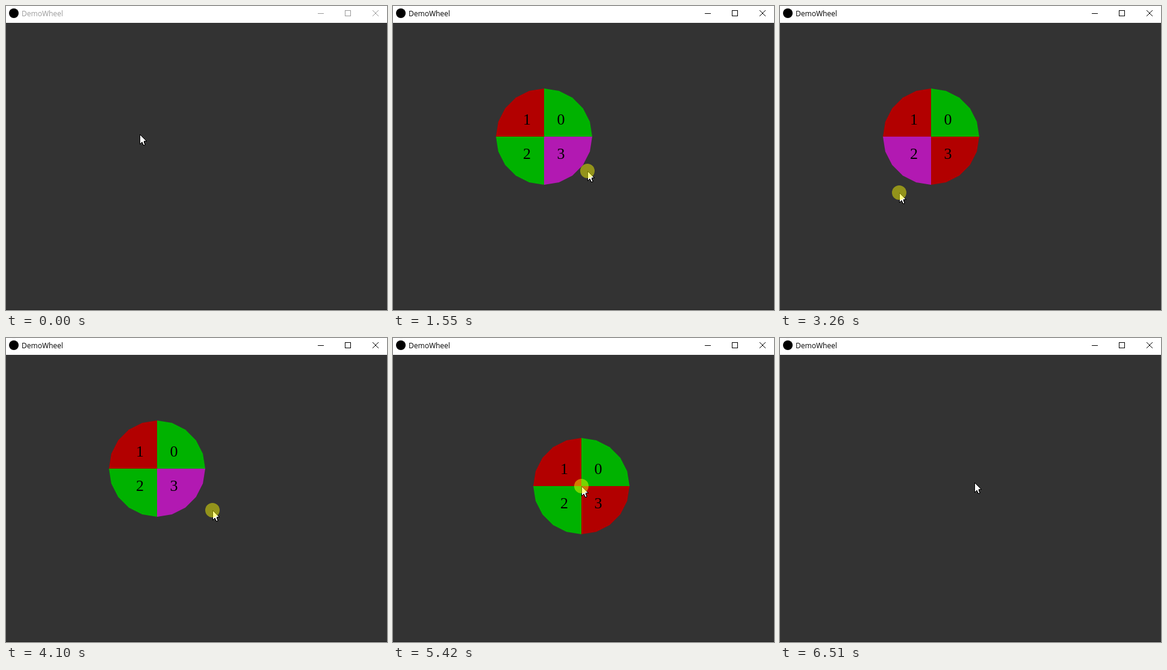
Recreate the animation shown at these times as an HTML page. Size 633 px wide and 505 px high, loop 6590 ms.

```html
<!DOCTYPE html>
<html lang="en">
<head>
<meta charset="utf-8">
<title>Pie menu</title>
<style>
  html, body { margin: 0; width: 100%; height: 100%; overflow: hidden; background: #333; }
  svg { display: block; width: 633px; height: 505px; }
  .title { font: 12px "Open Sans", sans-serif; }
  .digit { font: 26px "Liberation Serif", serif; text-anchor: middle; }
  .crisp { shape-rendering: crispEdges; }
</style>
</head>
<body>
<svg viewBox="0 0 633 505">
  <rect width="633" height="505" fill="#333"/>
  <rect y="504" width="633" height="1" fill="#222"/>
  <rect width="633" height="28" fill="#fff"/>
  <circle cx="13" cy="12" r="8"/>
  <text id="title" class="title" x="26" y="17">DemoWheel</text>
  <g id="buttons" fill="none">
    <path class="crisp" d="M518 12.5h10M563.5 7.5h9v9h-9z"/>
    <path d="M609 7l10 10M619 7l-10 10"/>
  </g>
  <g id="pie"></g>
  <path id="cursor" class="crisp" d="M.5 .5V16.5L4 13 6.5 18.5H8.5L9 16.5 7 12.5V11.5H11.5Z" fill="#fff" stroke="#000"/>
  <circle id="press" r="12" fill="#ff0" fill-opacity=".47"/>
</svg>
<script>
const DURATION = 6590, STEP = 76.6, TICK = 5;
const RADIUS = 80, DEAD_ZONE = 10, ARC_SIDES = 5, QUARTER = Math.PI / 2;
const GREEN = '#00b200', RED = '#b20000', HOVER = '#b219b2';

// Each stroke carries the cursor on to x, y; orbits turn counterclockwise about the menu
const START = { x: 222, y: 213 };
const strokes = [
  { from: 70, to: 230, x: 251, y: 217 },
  { from: 1160, to: 1550, x: 323, y: 274 },
  { from: 1800, to: 2260, x: 231, y: 140, orbit: true },
  { from: 2330, to: 2720, x: 215, y: 262, orbit: true },
  { from: 2870, to: 3030, x: 61, y: 385 },
  { from: 3180, to: 3180, x: 39, y: 350 },
  { from: 3260, to: 3260, x: 198, y: 310 },
  { from: 3330, to: 3410, x: 275, y: 268, orbit: true },
  { from: 3640, to: 3720, x: 337, y: 283 },
  { from: 3950, to: 4030, x: 265, y: 227 },
  { from: 4100, to: 4100, x: 343, y: 286 },
  { from: 4180, to: 4180, x: 357, y: 299 },
  { from: 4330, to: 4410, x: 313, y: 246 },
  { from: 5800, to: 5800, x: 300, y: 257 },
  { from: 5880, to: 5970, x: 277, y: 191 },
  { from: 6440, to: 6510, x: 368, y: 289 }
];
const presses = [
  { from: 380, to: 550 }, { from: 1160, to: 4640 },
  { from: 5420, to: 5570 }, { from: 5800, to: 6200 }
];
const menus = [
  { from: 380, to: 4640, x: 251, y: 217 },
  { from: 5420, to: 6270, x: 313, y: 246 }
];

const el = id => document.getElementById(id);
const place = (node, { x, y }) => node.setAttribute('transform', `translate(${x} ${y})`);
const show = (node, visible) => node.setAttribute('visibility', visible ? 'visible' : 'hidden');
const activeAt = (spans, t) => spans.find(({ from, to }) => t >= from && t < to);
const lerp = (a, b, p) => a + (b - a) * p;
const mod = (a, n) => (a % n + n) % n;

function polar(point, center) {
  const dx = point.x - center.x, dy = center.y - point.y;
  return { r: Math.hypot(dx, dy), angle: mod(Math.atan2(dy, dx), 4 * QUARTER) };
}

function between(a, b, p, center) {
  if (!b.orbit) return { x: Math.round(lerp(a.x, b.x, p)), y: Math.round(lerp(a.y, b.y, p)) };
  const start = polar(a, center), end = polar(b, center);
  const r = lerp(start.r, end.r, p);
  const angle = start.angle + mod(end.angle - start.angle, 4 * QUARTER) * p;
  return {
    x: Math.round(center.x + r * Math.cos(angle)),
    y: Math.round(center.y - r * Math.sin(angle))
  };
}

// The cursor jumps once per STEP, as in a screen recording
function cursorAt(t, center) {
  const i = strokes.findLastIndex(s => s.from <= t);
  if (i < 0) return START;
  const stroke = strokes[i];
  const steps = Math.round((stroke.to - stroke.from) / STEP) + 1;
  const done = Math.floor((t - stroke.from + TICK) / STEP) + 1;
  return between(strokes[i - 1] ?? START, stroke, Math.min(done / steps, 1), center);
}

function addPart(tag, attributes, text = '') {
  const node = document.createElementNS('http://www.w3.org/2000/svg', tag);
  for (const name in attributes) node.setAttribute(name, attributes[name]);
  node.textContent = text;
  return el('pie').appendChild(node);
}

// Quadrants run counterclockwise from the upper right
const wedges = [0, 1, 2, 3].map(q => {
  let d = 'M0 0';
  for (let i = 0; i <= ARC_SIDES; i++) {
    const angle = (q + i / ARC_SIDES) * QUARTER;
    d += `L${(RADIUS * Math.cos(angle)).toFixed(2)} ${(-RADIUS * Math.sin(angle)).toFixed(2)}`;
  }
  return addPart('path', { d: d + 'Z' });
});
wedges.forEach((_, q) => addPart('text', {
  class: 'digit',
  x: q % 3 ? -28.5 : 28,
  y: q < 2 ? -20 : 37
}, q));

function render(t) {
  const menu = activeAt(menus, t);
  const cursor = cursorAt(t, menu);
  place(el('cursor'), cursor);
  place(el('press'), cursor);
  show(el('press'), activeAt(presses, t));

  const tint = t < menus[0].from ? '#999' : '#000';
  el('title').setAttribute('fill', tint);
  el('buttons').setAttribute('stroke', tint);

  show(el('pie'), menu);
  if (!menu) return;
  place(el('pie'), menu);
  const { r, angle } = polar(cursor, menu);
  const hovered = r < DEAD_ZONE ? -1 : Math.floor(angle / QUARTER);
  wedges.forEach((wedge, q) =>
    wedge.setAttribute('fill', q === hovered ? HOVER : q % 2 ? RED : GREEN));
}

const start = performance.now();
function tick() {
  render((performance.now() - start) % DURATION);
  requestAnimationFrame(tick);
}
tick();
</script>
</body>
</html>
```
